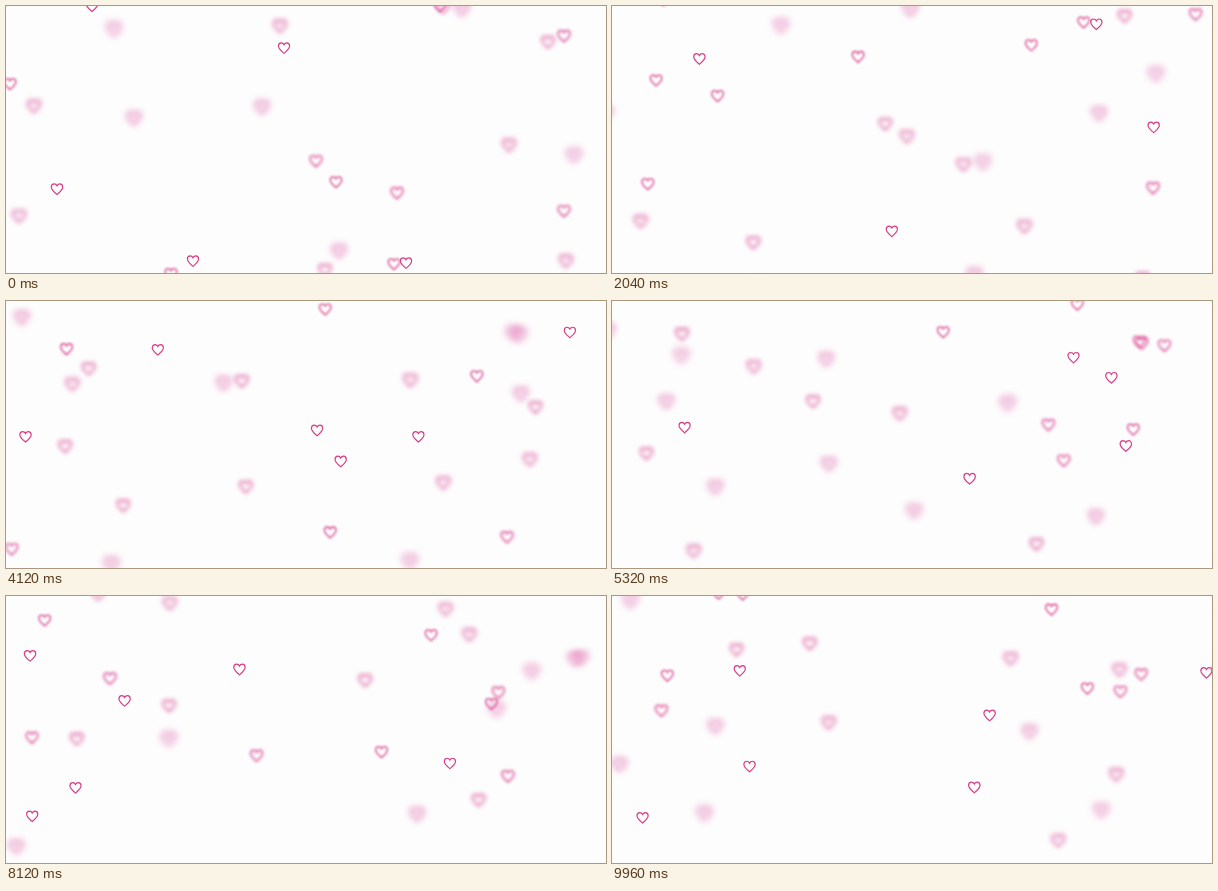
Write an HTML page with a canvas that moves like this. It is 600 by 267 pixels and loops after 10 s.

```html
<!DOCTYPE html>
<html lang="en">
<head>
<meta charset="utf-8">
<title>Drifting hearts</title>
<style>
  html, body { margin: 0; width: 100%; height: 100%; overflow: hidden; background: #fdfdfd; }
  canvas { display: block; width: 600px; height: 267px; }
</style>
</head>
<body>
<canvas id="stage" width="600" height="267"></canvas>
<script>
const WIDTH = 600, HEIGHT = 267, MARGIN = 14;
const LOOP = 10, STEP = 0.04;
const MAX_BLUR = 3.9;
const PERIODS = [3.8, 4.8, 8]; // fast, medium and slow focus swings, in seconds

// Start x, y and velocity in px/s. Each line holds a fast, a medium and a slow
// swing; the lines run from early to late focus.
const hearts = [
  [165, 268, -11.6, -15.4], [128, 112, -11, -10.8], [434, 0, -7.2, 19.2],
  [400, 257, -18.4, 17.9], [560, 255, -14.3, 17.2], [319, 264, -19.2, -19],
  [186, -9, -8.3, 14], [391, 187, -19.4, -14], [28, 100, 7.9, -12.6],
  [4, 78, -12.5, 14], [330, 176, 20, -9.8], [603, -14, -9.5, 11],
  [542, 36, -14.4, -12.7], [278, 42, 10, -19], [256, 101, 19.1, 14.4],
  [13, 210, 11.2, -15.7], [51, 183, -11, 15.8], [503, 139, -7.8, -15.5],
  [568, 149, -12.9, -13.6], [558, 205, -8.3, -11.3], [558, 30, -6.9, 18.5],
  [456, 3, 13.9, 7.4], [437, 1, 17, 7.5], [388, 258, 12, -18.5],
  [274, 20, -13.7, 15.1], [333, 245, 17.2, 13.9], [187, 255, -19.8, 10.7],
  [310, 155, -18, -18.2], [108, 23, -10.1, 14.6], [86, 0, -17, -10.8]
];

const ctx = document.getElementById('stage').getContext('2d');
const shape = new Path2D(
  'M0 5.3C-1.8 3.6-5.5 1.1-5.5-1.9C-5.5-3.8-4.2-5-2.7-5C-1.5-5-.5-4.2 0-3.2' +
  'C.5-4.2 1.5-5 2.7-5C4.2-5 5.5-3.8 5.5-1.9C5.5 1.1 1.8 3.6 0 5.3Z');

// Bounce between two walls just outside the stage
function bounce(p, size) {
  const span = size + 2 * MARGIN;
  const q = (p + MARGIN + 2 * span) % (2 * span);
  return Math.min(q, 2 * span - q) - MARGIN;
}

// Triangle wave: in focus at 0, softest half a period later
function blurAt(i, t) {
  const period = PERIODS[i % 3];
  const rank = Math.floor(i / 3) / (hearts.length / 3 - 1);
  const u = (t - LOOP / 2) / period - 0.95 * (rank - 0.5);
  return Math.max(0.25, 2 * MAX_BLUR * Math.abs(u - Math.round(u)));
}

function drawHeart([x, y, vx, vy], blur, t) {
  const scale = 1 + 0.05 * blur;
  ctx.save();
  ctx.translate(bounce(x + vx * t, WIDTH), bounce(y + vy * t, HEIGHT));
  ctx.scale(scale, scale);
  ctx.filter = `blur(${blur.toFixed(2)}px)`;
  ctx.strokeStyle = `hsl(${333 - 2.5 * blur} 66% ${53 + 2.5 * blur}%)`;
  ctx.lineWidth = 1.1 + 0.13 * blur;
  ctx.stroke(shape);
  ctx.restore();
}

function draw(t) {
  ctx.fillStyle = '#fdfdfd';
  ctx.fillRect(0, 0, WIDTH, HEIGHT);
  hearts.forEach((heart, i) => drawHeart(heart, blurAt(i, t), t));
}

const start = performance.now();
function tick() {
  const t = ((performance.now() - start) / 1000) % LOOP;
  draw(Math.floor(t / STEP) * STEP);
  requestAnimationFrame(tick);
}
tick();
</script>
</body>
</html>
```
